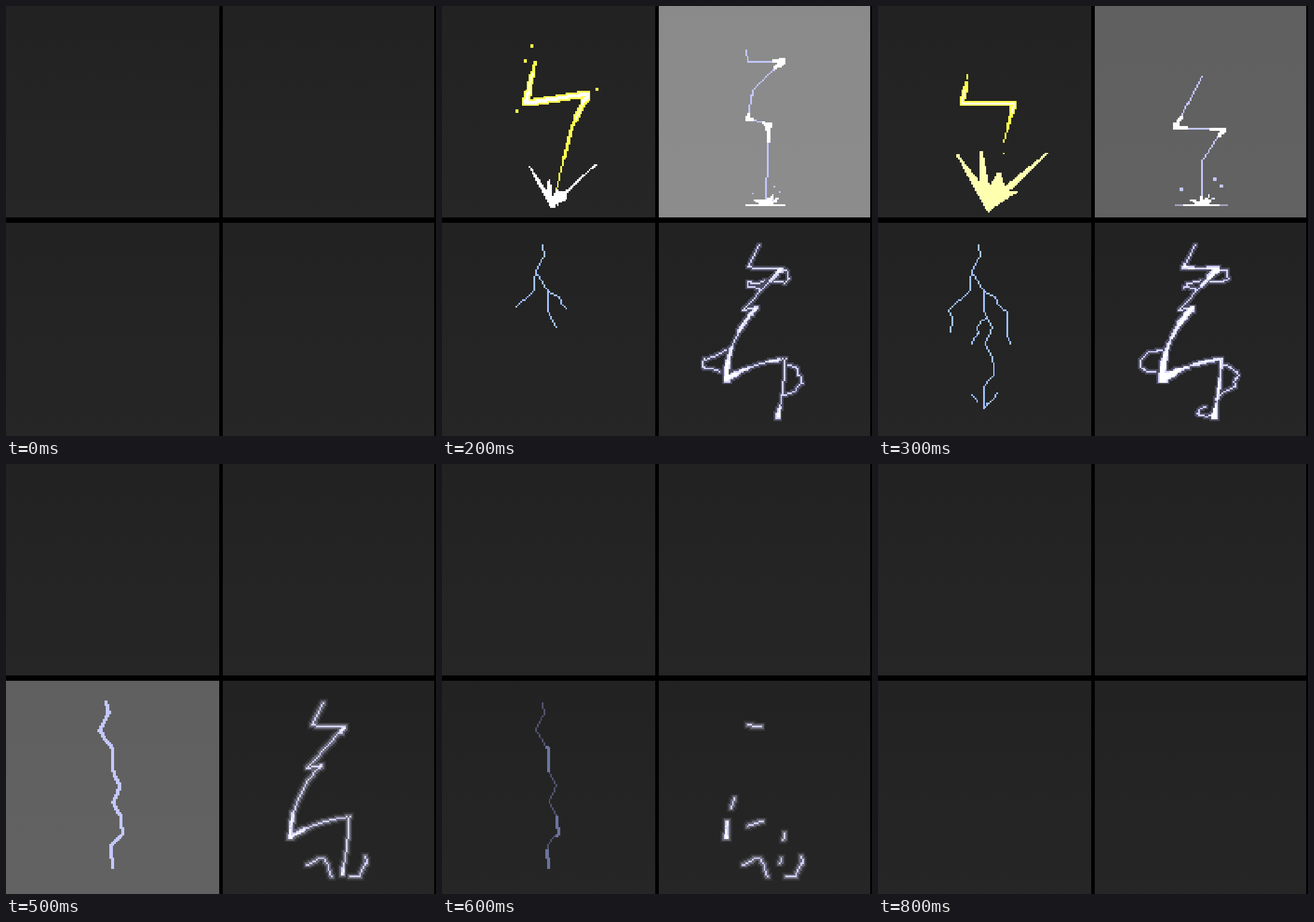
An HTML page with a canvas for the animation above (1.1 s loop, 720 by 720 pixels).

```html
<!DOCTYPE html>
<html lang="en">
<head>
<meta charset="utf-8">
<title>Four lightning strikes</title>
<style>
html, body { margin: 0; width: 100%; height: 100%; overflow: hidden; background: #000; }
canvas { display: block; width: 720px; height: 720px; image-rendering: pixelated; }
</style>
</head>
<body>
<canvas id="stage" width="258" height="258"></canvas>
<script>
const LOOP = 1100, STEP = 100, LAST = 8;
const SCALE = 258 / 720;
const ctx = document.getElementById('stage').getContext('2d');

const YELLOW = '#ffff50', CREAM = '#ffffb0', WHITE = '#fff';
const LILAC = '#c4c8ff', BLUE = '#a2c2ff';

const clamp = v => Math.max(0, Math.min(1, v));
const noise = n => { const v = Math.sin(n * 12.9898) * 43758.5453; return 2 * (v - Math.floor(v)) - 1; };

// Samples keys [x, y, width, bend] once per cell; pinch thins the middle of each segment.
function trace(keys, pinch = 0) {
  const pts = [];
  keys.slice(1).forEach(([bx, by, bw = 1, bend = 0], i) => {
    const [ax, ay, aw = 1] = keys[i];
    const dx = bx - ax, dy = by - ay;
    const n = Math.max(1, Math.ceil(Math.max(Math.abs(dx), Math.abs(dy)) * SCALE));
    for (let k = i ? 1 : 0; k <= n; k++) {
      const f = k / n, side = bend * 4 * f * (1 - f);
      const w = 1 + (aw + (bw - aw) * f - 1) * Math.abs(1 - 2 * f) ** pinch;
      pts.push([(ax + dx * f - dy * side) * SCALE, (ay + dy * f + dx * side) * SCALE, w]);
    }
  });
  return pts;
}

const part = (pts, from, to) =>
  pts.slice(Math.round(from * (pts.length - 1)), Math.round(to * (pts.length - 1)) + 1);

function stroke(color, pts, grow = 0, factor = 1) {
  ctx.fillStyle = color;
  for (const [x, y, width] of pts) {
    const w = Math.max(1, Math.round(width * factor)) + grow;
    if (w > 0) ctx.fillRect(Math.round(x - w / 2), Math.round(y - w / 2), w, w);
  }
}

const line = (color, ...keys) => stroke(color, trace(keys));
const dot = (color, x, y, w = 1) => stroke(color, [[x * SCALE, y * SCALE, w]]);

// Scanline polygon without antialiasing.
function fill(color, shape) {
  const pts = shape.map(([x, y]) => [x * SCALE, y * SCALE]);
  const ys = pts.map(p => p[1]);
  ctx.fillStyle = color;
  for (let y = Math.floor(Math.min(...ys)); y <= Math.max(...ys); y++) {
    const c = y + 0.5, hits = [];
    pts.forEach(([ax, ay], i) => {
      const [bx, by] = pts[(i + 1) % pts.length];
      if (ay <= c !== by <= c) hits.push(ax + (bx - ax) * (c - ay) / (by - ay));
    });
    hits.sort((a, b) => a - b);
    for (let i = 0; i + 1 < hits.length; i += 2) {
      const l = Math.round(hits[i]);
      ctx.fillRect(l, y, Math.max(1, Math.round(hits[i + 1]) - l), 1);
    }
  }
}

function panel(x, y, w, h, flash = 0) {
  const g = ctx.createLinearGradient(0, y, 0, y + h);
  g.addColorStop(0, '#222222');
  g.addColorStop(1, '#262626');
  ctx.fillStyle = g;
  ctx.fillRect(x, y, w, h);
  ctx.fillStyle = `rgba(255,255,255,${flash})`;
  ctx.fillRect(x, y, w, h);
}

// Top left: a yellow bolt eaten away from its ends, over a starburst.
// Each ray: tip offset, share of it reached at first, place of its leftover.
const rays = [[-53, -96, 0.73, 0.72], [-12, -101, 0.46, 1.02], [18, -66, 0.45, 0], [98, -98, 0.75, 0.95], [50, -34, 0.5, 1.05]];

function burst(color, x, y, reach) {
  const tips = rays.map(r => [r[0] * reach(r), r[1] * reach(r)]);
  const star = [[-5, -4]];
  tips.forEach(([tx, ty], i) => {
    star.push([tx - 2, ty], [tx + 2, ty]);
    const next = tips[i + 1] || [0, 0];
    star.push([(tx + next[0]) * 0.24, (ty + next[1]) * 0.26]);
  });
  star.push([8, -5], [0, 1]);
  fill(color, star.map(([dx, dy]) => [x + dx, y + dy]));
}

function strike(step) {
  if (step < 1 || step > 4) return;
  if (step === 4) {
    for (const [dx, dy, , at] of rays) {
      const far = at + 22 / Math.hypot(dx, dy);
      if (at) line(CREAM, [185 + dx * at, 344 + dy * at, 2], [185 + dx * far, 344 + dy * far, 1]);
    }
    return;
  }
  const shrink = step === 3 ? 16 : 0;
  const bolt = trace([[166, 6, 1], [156, 94, 2], [140, 163, 4], [244 - shrink, 147 + shrink, 4], [217, 203, 2], [192, 306, 1]]);
  const [from, to] = [[0, 1], [0.21, 1], [0.315, 0.8]][step - 1];
  const rest = part(bolt, from, to);
  const thin = step === 3 ? 0.75 : 1;
  stroke(YELLOW, rest, 0, thin);
  stroke(WHITE, rest, -2, thin);
  if (step === 1) return burst(WHITE, 185, 338, () => 0.3);
  if (step === 2) {
    for (const [x, y] of [[151, 66], [139, 91], [125, 176], [260, 139]]) dot(YELLOW, x, y, 2);
    burst(WHITE, 185, 338, r => r[2]);
  } else {
    line(YELLOW, [148, 116], [148, 121]);
    dot(YELLOW, 211, 248);
    burst(CREAM, 185, 344, () => 1);
  }
}

// Top right: a thin bolt sliding down, with drops and a spreading ground line.
const slide = {
  1: [[530, 6], [508, 94, 3], [571, 95, 3], [516, 180, 3], [547, 199, 3], [544, 330, 2]],
  2: [[508, 75], [513, 94], [570, 93, 4], [521, 140], [512, 188, 3], [547, 199, 3], [543, 325]],
  3: [[542, 118], [498, 203, 3], [578, 207, 3], [544, 258], [541, 330, 2]],
  4: [[500, 190], [502, 205], [573, 198, 2], [566, 211]]
};
const drops = [[-34, -26], [20, -43], [33, -31], [16, -12]];

function splash(step) {
  if (!slide[step]) return;
  const bolt = trace(slide[step], 2);
  stroke(step === 4 ? '#a8b2ff' : LILAC, bolt);
  stroke(WHITE, bolt.filter(p => p[2] >= 1.5));
  if (step === 1) return;

  const age = step - 2;
  const half = 32 + 9.5 * age + 2.5 * age * age;
  line(['#fff', '#a0a2b8', '#646a86'][age], [541 - half, 334], [541 + half, 334]);
  if (age < 2) line(WHITE, [512, 334], [570, 334]);
  else {
    line('#484d60', [525, 331], [557, 331]);
    line('#a8b2ff', [548, 240], [536, 256, 2], [542, 283]);
  }
  const spread = 0.7 + 0.3 * age;
  drops.forEach(([dx, dy], i) => {
    dot(LILAC, 543 + dx * spread, 333 + dy * spread, age === 1 && i < 3 ? 2 : 1);
    if (age < 2) line(WHITE, [543 + dx * 0.2, 333 + dy * 0.1, 3 - age], [543 + dx * 0.6, 333 + dy * 0.35, 1]);
  });
  if (age < 2) dot(WHITE, 543, 329, 3);
}

// Bottom left: a leader grows to the ground, then the return stroke fades.
const trunk = trace([[168, 400], [172, 416], [157, 446], [178, 478], [178, 511], [191, 541], [179, 566],
  [192, 590], [195, 619], [176, 638], [178, 675]]);
const barbs = trace([[159, 651], [177, 675], [200, 648]]);
// Each branch leaves the trunk when the leader has come that far.
const branches = [
  [0.17, [[157, 446], [154, 476], [118, 509], [124, 520], [122, 545]]],
  [0.28, [[178, 478], [198, 489], [200, 498], [215, 513], [215, 550], [223, 565]]],
  [0.43, [[182, 520], [166, 537], [168, 547], [157, 566]]]
].map(([start, keys]) => [start, trace(keys)]);

function leader(step) {
  if (step === 2 || step === 3) {
    const grown = (step - 1) / 2;
    stroke(BLUE, part(trunk, 0, grown));
    for (const [start, pts] of branches) {
      const reach = clamp((grown - start) / 0.55);
      if (reach > 0.2) stroke(BLUE, part(pts, 0, reach));
    }
    if (grown === 1) {
      stroke(BLUE, part(barbs, 0, 0.2));
      stroke(BLUE, part(barbs, 0.45, 1));
    }
  } else if (step === 4) {
    for (const [color, grow] of [[LILAC, 2], [WHITE, 1]]) {
      stroke(color, trunk, grow);
      stroke(color, barbs, grow);
    }
  } else if (step === 5) {
    stroke(LILAC, trunk, 1);
  } else if (step === 6 || step === 7) {
    const late = step === 7;
    if (!late) stroke('#50536e', trunk);
    for (const [a, b] of [[0.275, 0.41], [0.7, 0.8], [0.9, 1]]) {
      stroke(late ? '#3c3e50' : '#6c739e', part(trunk, a, b), late ? 0 : 1);
    }
  }
}

// Bottom right: a glowing arc with side loops that flicker.
const body = trace([[531, 401, 1], [512, 438, 2], [568, 439, 2], [567, 441, 4], [505, 509, 1], [527, 506, 3],
  [476, 624, 5, 0.1], [575, 591, 2, -0.05], [571, 640, 2], [563, 687, 4]], 0.6);
// Each loop: both feet and how far it swings out.
const loops = [
  [574, 441, 558, 463, 16, 4], [541, 460, 533, 475, -24, 0], [477, 576, 466, 612, -32, 4],
  [579, 600, 571, 652, 27, 0], [558, 684, 548, 672, -14, 4]
];
const scraps = [[0.076, 0.12], [0.494, 0.522], [0.568, 0.62], [0.69, 0.738], [0.866, 0.884], [0.946, 0.96]];
const tails = [[505, 672, 545, 692, 6, -19], [577, 692, 602, 656, 10, 6]];

function curl([ax, ay, bx, by, ox, oy], seed) {
  const keys = [];
  for (let k = 0; k <= 7; k++) {
    const f = k / 7, out = Math.sin(Math.PI * f) ** 0.6, shake = k % 7 ? 4 : 0;
    keys.push([ax + (bx - ax) * f + ox * out + shake * noise(seed + k),
      ay + (by - ay) * f + oy * out + shake * noise(seed + k + 50)]);
  }
  return trace(keys);
}

function glow(paths, halos, factor = 1) {
  for (const [grow, color] of halos) paths.forEach(p => stroke(color, p, grow, factor));
  paths.forEach(p => stroke('#d2d2ff', p, 0, factor));
  paths.forEach(p => stroke(WHITE, p, -1, factor));
}

function arc(step) {
  const soft = [[2, '#4c4c60']], wide = [[4, '#343437'], [2, '#666672']];
  const ends = tails.map((t, i) => curl(t, 70 + i * 9));
  const bits = scraps.map(([a, b]) => part(body, a, b));
  if (step === 1) glow([body], [], 0.4);
  else if (step >= 2 && step <= 4) {
    const sides = loops.slice(0, step === 2 ? 4 : 5).map((l, i) => curl(l, step * 31 + i * 9));
    glow([body, ...sides], step === 4 ? wide : soft, step === 2 ? 0.7 : 0.95);
  } else if (step === 5) glow([body, ...ends], wide, 0.5);
  else if (step === 6) glow([...bits, ...ends], wide, 0.5);
  else if (step === 7) glow(ends.map(p => part(p, 0.4, 0.6)), [[2, '#444448']]);
}

const flashAt = age => [0.47, 0.28][age] || 0;
let shown = -1;

function draw(step) {
  ctx.fillStyle = '#000';
  ctx.fillRect(0, 0, 258, 258);
  panel(0, 0, 128, 127);
  panel(130, 0, 127, 127, flashAt(step - 2));
  panel(0, 130, 128, 128, flashAt(step - 4));
  panel(130, 130, 127, 128);
  for (const bolt of [strike, splash, leader, arc]) bolt(step);
}

function tick() {
  const step = Math.min(LAST, Math.floor(performance.now() % LOOP / STEP));
  if (step !== shown) draw(shown = step);
  requestAnimationFrame(tick);
}
tick();
</script>
</body>
</html>
```
